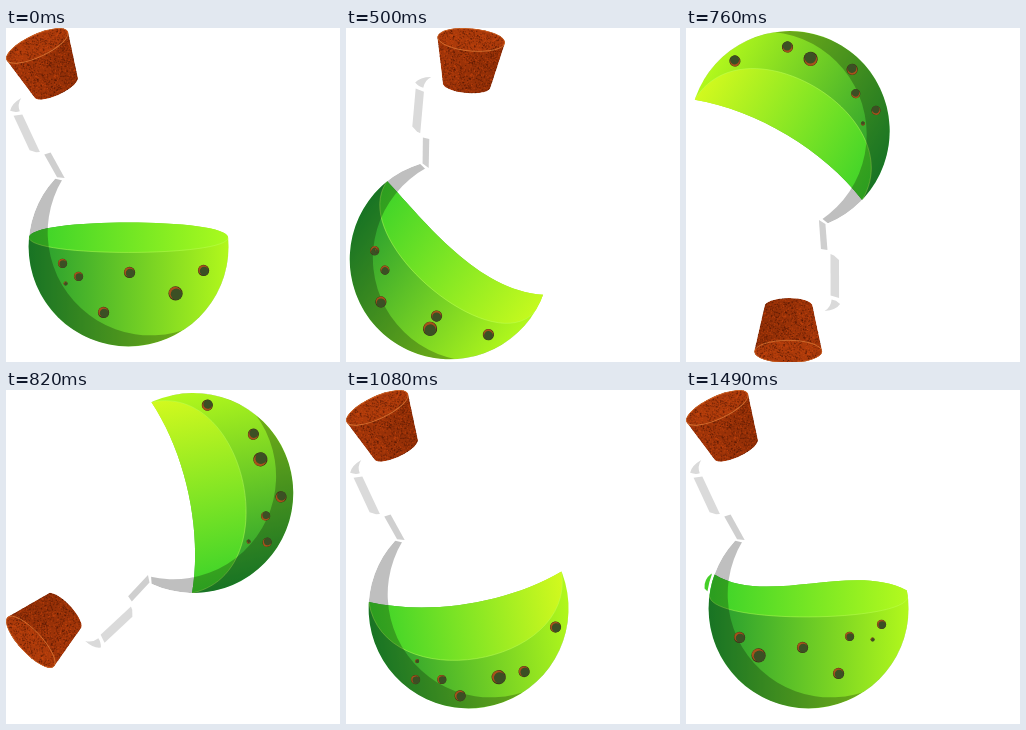
An HTML page with a canvas that plays this animation: 334 by 334 pixels, repeating every 1560 ms.

```html
<!DOCTYPE html>
<html lang="en">
<head>
<meta charset="utf-8">
<title>Rolling flask</title>
<style>
html, body { margin: 0; width: 100%; height: 100%; overflow: hidden; background: #fff; }
canvas { display: block; width: 334px; height: 334px; }
</style>
</head>
<body>
<canvas id="stage"></canvas>
<script>
const SIZE = 334, LOOP = 1560, R = 100, RAD = Math.PI / 180;
const canvas = document.getElementById('stage');
const ctx = canvas.getContext('2d');
const dpr = window.devicePixelRatio || 1;
canvas.width = canvas.height = SIZE * dpr;

// Moments at which the picture advances
const ticks = [0];
for (let t = 370, i = 0; t < 1020; t += i++ % 3 === 2 ? 70 : 30) ticks.push(t);
ticks.push(1020, 1080, 1150, 1220, 1290, 1350, 1420, 1490);

// Flask angle in degrees, clockwise from upright
const TURN = [[370, -35], [630, 83], [820, 227], [950, 318.5], [1020, 334], [1080, 335]];

// Liquid: angle to flask, upper ends, upper handles, handle reach,
// lower ends, lower handles, red level of the bright end
const REST = [25, -9, -9, -20, -20, 1, -9, -9, 20, 20, 170];
const LIFT = [31, -32, -32, -5, 50, .45, -32, 5, 40, 31, 178];
const SPUN = [31, -22, -22, 23, 23, .4, -22, -22, 97, 97, 212];
const BACK = [16, ...SPUN.slice(1)];
const SWAY = [30, -27, -20, 24, 8, .42, -18, -18, 60, 58, 190];
const CALM = [25, -34, -18, 32, -29, .45, -13, -12, 30, 26, 180];
const LIQUID = [[370, LIFT], [600, SPUN], [950, SPUN], [1020, BACK], [1080, BACK], [1290, SWAY], [1490, CALM]];

// Bubble centres as x, y pairs in the liquid's frame
const RADII = [5.6, 5.6, 7.1, 5.6, 4.6, 4.6, 2];
const B_REST = [75, 24, 1, 26, 47, 47, -25, 66, -50, 30, -66, 17, -63, 37];
const B_LIFT = [66, 46, -6, 31, 33, 61.5, -41.5, 62, -57, 22, -68.5, 5, -71, 25];
const B_SPUN = [83, 32, 45, 71, 19, 72.6, -22, 85, -37.5, 66, -63.5, 62, -59, 44];
const B_CALM = [-69, 29, -6, 39, -50, 47, 30, 65, 41, 28, 73, 16, 64, 31];
const BUBBLES = [[370, B_LIFT], [600, B_SPUN], [1080, B_SPUN], [1490, B_CALM]];

const TOP = { x: 2, y: -220.5, rx: 34, ry: 11.5 };
const END = { x: 1.5, y: -175, rx: 24, ry: 8 };

function rng(seed) {
  return () => (seed = (seed * 16807) % 2147483647) / 2147483647;
}
const rand = rng(77);
const grain = Array.from({ length: 1900 }, () => ({
  x: -34 + rand() * 72, y: -233 + rand() * 68, tone: rand()
}));

function segment(keys, t) {
  let i = 0;
  while (i < keys.length - 2 && t >= keys[i + 1][0]) i++;
  const u = (t - keys[i][0]) / (keys[i + 1][0] - keys[i][0]);
  return [i, Math.max(0, Math.min(1, u))];
}

function blend(keys, t) {
  const [i, u] = segment(keys, t);
  return keys[i][1].map((v, n) => v + (keys[i + 1][1][n] - v) * u);
}

function curve(keys, t) {
  const [i, u] = segment(keys, t);
  const slope = n => n < 1 || n > keys.length - 2 ? 0
    : (keys[n + 1][1] - keys[n - 1][1]) / (keys[n + 1][0] - keys[n - 1][0]);
  const [t0, a] = keys[i], [t1, b] = keys[i + 1], d = t1 - t0, v = 1 - u;
  return a * v * v * (1 + 2 * u) + b * u * u * (3 - 2 * u)
    + d * u * v * (v * slope(i) - u * slope(i + 1));
}

function circle(x, y, r) {
  ctx.moveTo(x + r, y);
  ctx.arc(x, y, r, 0, 7);
}

function disc(x, y, r, fill) {
  ctx.beginPath();
  circle(x, y, r);
  ctx.fillStyle = fill;
  ctx.fill();
}

function poly(pts, fill) {
  ctx.beginPath();
  pts.forEach(p => ctx.lineTo(p[0], p[1]));
  ctx.closePath();
  if (fill) {
    ctx.fillStyle = fill;
    ctx.fill();
  }
}

function ramp(from, to) {
  const g = ctx.createLinearGradient(-R, 0, R, 0);
  g.addColorStop(0, from);
  g.addColorStop(1, to);
  return g;
}

function clipBody() {
  ctx.beginPath();
  circle(0, 0, R);
  ctx.clip();
}

function scoped(angle, draw) {
  ctx.save();
  ctx.rotate(angle * RAD);
  draw();
  ctx.restore();
}

// The drawing is kept against the stage's top left corner
function place(deg) {
  const c = Math.cos(deg * RAD), s = Math.sin(deg * RAD);
  const left = Math.hypot(TOP.rx * c, TOP.ry * s) - (TOP.x * c - TOP.y * s);
  const top = Math.hypot(TOP.rx * s, TOP.ry * c) - (TOP.x * s + TOP.y * c);
  ctx.translate(Math.max(103.7, left), Math.max(103, top));
}

function drawLiquid(s) {
  const [, yl, yr, u1, u2, k, ml, mr, l1, l2, red] = s;
  const edge = y => Math.sqrt(R * R - y * y);
  const upper = () => {
    const a = edge(yl), b = edge(yr);
    ctx.moveTo(-a, yl);
    ctx.bezierCurveTo(-a * k, yl + u1, b * k, yr + u2, b, yr);
  };
  const lower = () => ctx.bezierCurveTo(edge(mr), mr + l2, -edge(ml), ml + l1, -edge(ml), ml);

  clipBody();
  ctx.beginPath();
  upper();
  [[110, yr], [110, 110], [-110, 110], [-110, yl]].forEach(p => ctx.lineTo(...p));
  ctx.fillStyle = ramp('#209a30', '#b2f81c');
  ctx.fill();

  ctx.beginPath();
  upper();
  [[110, yr], [110, mr], [edge(mr), mr]].forEach(p => ctx.lineTo(...p));
  lower();
  [[-110, ml], [-110, yl]].forEach(p => ctx.lineTo(...p));
  ctx.fillStyle = ramp('#38d22a', `rgb(${red},250,30)`);
  ctx.fill();

  ctx.beginPath();
  ctx.moveTo(edge(mr), mr);
  lower();
  ctx.strokeStyle = 'rgba(190,255,90,.55)';
  ctx.lineWidth = .8;
  ctx.stroke();
}

function drawBubbles(pts) {
  RADII.forEach((r, i) => {
    const x = pts[2 * i], y = pts[2 * i + 1];
    disc(x, y, r, '#40301a');
    disc(x - r * .06, y - r * .06, r * .88, '#a8521a');
    disc(x + r * .12, y + r * .12, r * .8, '#3b5024');
  });
}

function drawShade() {
  ctx.save();
  poly([[-120, -158], [50, -22], [120, 120], [-120, 120]]);
  ctx.clip();
  clipBody();
  ctx.beginPath();
  circle(0, 0, R);
  circle(26, -3.4, 103);
  ctx.fillStyle = 'rgba(0,0,0,.25)';
  ctx.fill('evenodd');
  ctx.restore();
}

function drawNeck() {
  poly([[-37.5, -119], [-31, -118], [-29, -89], [-35.5, -93]], '#cfcfcf');
  poly([[-49, -167], [-40.5, -164.5], [-40.5, -123], [-44, -124.5], [-49, -129]], '#dadada');
  ctx.beginPath();
  ctx.moveTo(-50, -173);
  ctx.quadraticCurveTo(-46, -179, -34.5, -180);
  ctx.quadraticCurveTo(-41, -176, -41.5, -168.5);
  ctx.quadraticCurveTo(-46, -169, -50, -173);
  ctx.fillStyle = '#dadada';
  ctx.fill();
}

function drawCork() {
  ctx.save();
  ctx.beginPath();
  ctx.ellipse(TOP.x, TOP.y, TOP.rx, TOP.ry, 0, Math.PI, 2 * Math.PI);
  ctx.ellipse(END.x, END.y, END.rx, END.ry, 0, 0, Math.PI);
  ctx.closePath();
  ctx.clip();
  const side = ctx.createLinearGradient(-34, 0, 38, 0);
  side.addColorStop(0, '#a43609');
  side.addColorStop(1, '#8c2c05');
  ctx.fillStyle = side;
  ctx.fill();
  ctx.beginPath();
  ctx.ellipse(TOP.x, TOP.y, TOP.rx, TOP.ry, 0, 0, 7);
  ctx.fillStyle = '#ab3a0a';
  ctx.fill();
  for (const g of grain) {
    ctx.fillStyle = g.tone < .55 ? 'rgba(70,18,0,.45)' : 'rgba(215,75,15,.4)';
    ctx.fillRect(g.x, g.y, 1.1, 1.1);
  }
  ctx.beginPath();
  ctx.ellipse(TOP.x, TOP.y, TOP.rx - .3, TOP.ry - .3, 0, 0, 7);
  ctx.strokeStyle = 'rgba(226,130,60,.75)';
  ctx.lineWidth = .9;
  ctx.stroke();
  ctx.restore();
}

function drawSplash() {
  ctx.beginPath();
  ctx.moveTo(-97, -35);
  ctx.quadraticCurveTo(-105, -29, -104, -20);
  ctx.lineTo(-101, -17);
  ctx.lineTo(-95, -28);
  ctx.fillStyle = '#45cf28';
  ctx.fill();
  ctx.beginPath();
  ctx.arc(0, 0, 101.3, 2.9, 3.7);
  ctx.strokeStyle = '#fff';
  ctx.lineWidth = 2.6;
  ctx.stroke();
}

function render(time) {
  const t = ticks.filter(v => v <= time).pop();
  const resting = t < 370;
  const deg = resting ? -25 : curve(TURN, t);
  const liquid = resting ? REST : blend(LIQUID, t);
  const bubbles = resting ? B_REST : blend(BUBBLES, t);

  ctx.setTransform(dpr, 0, 0, dpr, 0, 0);
  ctx.fillStyle = '#fff';
  ctx.fillRect(0, 0, SIZE, SIZE);
  place(deg);
  scoped(deg + liquid[0], () => {
    if (t >= 1420) drawSplash();
    drawLiquid(liquid);
  });
  scoped(deg, drawShade);
  scoped(deg + liquid[0], () => drawBubbles(bubbles));
  scoped(deg, () => {
    drawNeck();
    drawCork();
  });
}

const start = performance.now();
function loop() {
  render((performance.now() - start) % LOOP);
  requestAnimationFrame(loop);
}
loop();
</script>
</body>
</html>
```
